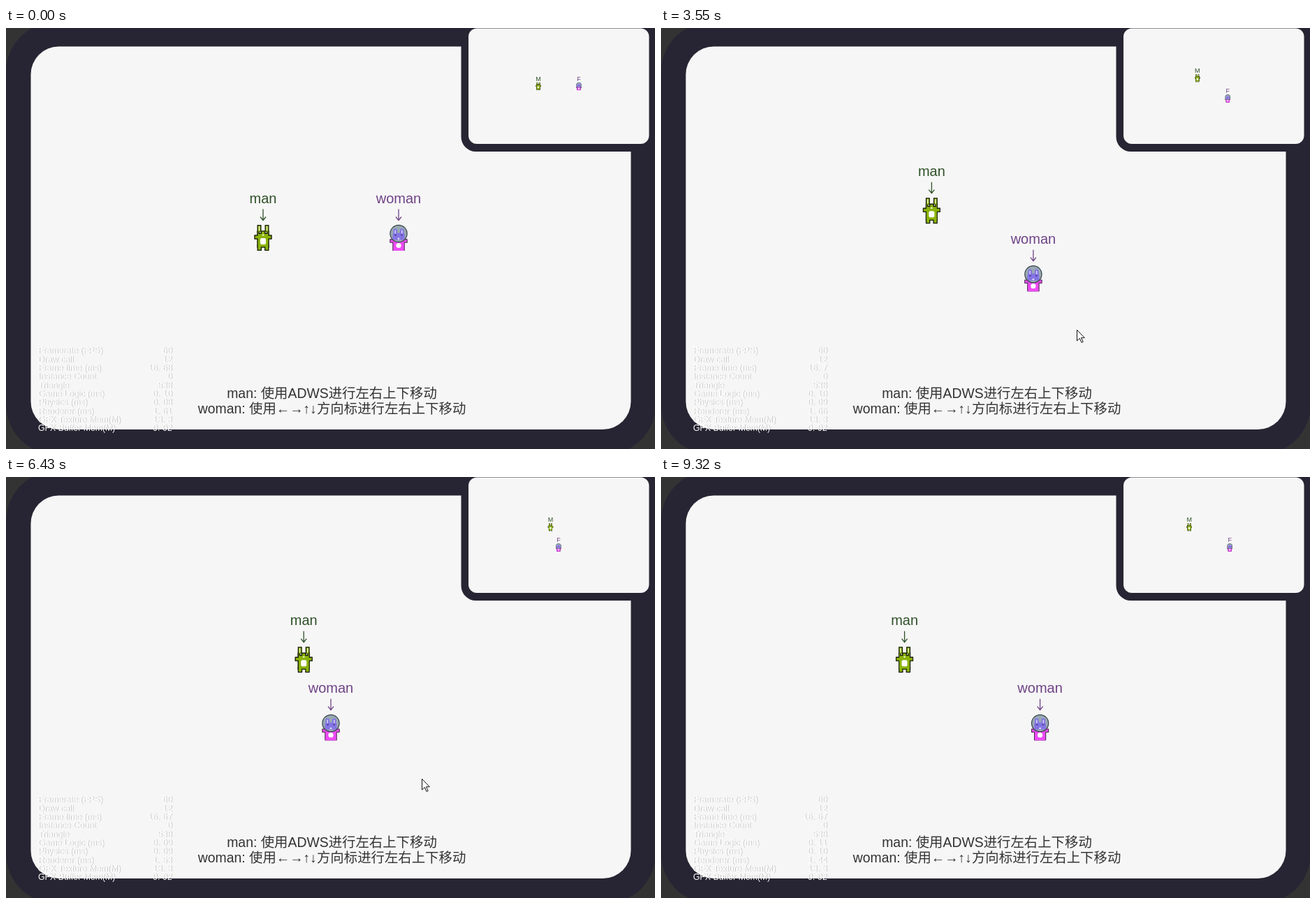
An HTML page with a canvas for the animation above (9.39 s loop, 929x603 px).

```html
<!DOCTYPE html>
<html lang="zh">
<head>
<meta charset="utf-8">
<title>Two players</title>
<style>
html, body { margin: 0; width: 100%; height: 100%; overflow: hidden; background: #333; }
canvas { display: block; width: 929px; height: 603px; }
</style>
</head>
<body>
<canvas id="stage" width="929" height="603"></canvas>
<script>
const ctx = document.getElementById('stage').getContext('2d');
const LOOP = 9390;
const CELL = 9.7;
const MINI = 0.3;
const FONT = '"Liberation Sans", Arial, "Noto Sans CJK SC", "Noto Sans CJK", sans-serif';
const DARK = '#272533';
const PAPER = '#f6f6f6';
const INK = '#333';

// Key poses: time, column, row. Steps between them are whole cells.
const MAN_PATH = [
  [2880, 0, 0], [3330, 0, -4], [3550, 2, -4], [3700, 2, -4], [5150, 6, -4],
  [6440, 6, -4], [6570, 7, -4], [7380, 1, -4], [7750, -2, -4]
];
const WOMAN_PATH = [
  [1900, 0, 0], [2230, -3, 0], [2860, -3, 6], [3750, -3, 6], [5000, -11, 6],
  [5340, -11, 6], [5660, -14, 6], [5880, -14, 6], [6430, -10, 6], [7380, -4, 6], [7550, -2, 6]
];

const LABELS = ['Framerate (FPS)', 'Draw call', 'Frame time (ms)', 'Instance Count', 'Triangle',
  'Game Logic (ms)', 'Physics (ms)', 'Renderer (ms)', 'GFX Texture Mem(M)', 'GFX Buffer Mem(M)'];

function noise(seed) {
  const v = Math.sin(seed * 12.9898 + 4.1) * 43758.5453;
  return v - Math.floor(v);
}

function position(path, t) {
  const next = path.findIndex(key => key[0] > t);
  if (next === 0) return { x: 0, y: 0 };
  const a = path.at(next < 0 ? -1 : next - 1);
  const b = path.at(next);
  const k = a === b ? 0 : (t - a[0]) / (b[0] - a[0]);
  const mix = i => Math.round(a[i] + (b[i] - a[i]) * k);
  return { x: mix(1), y: mix(2) };
}

function panel(x, y, w, h, r, color) {
  ctx.fillStyle = color;
  ctx.beginPath();
  ctx.roundRect(x, y, w, h, r);
  ctx.fill();
}

function text(str, x, y, size, color, align = 'center', weight = 400) {
  ctx.font = `${weight} ${size}px ${FONT}`;
  ctx.textAlign = align;
  ctx.fillStyle = color;
  ctx.fillText(str, x, y);
}

// Fills a rectangle and its mirror image across the middle line.
function pair(x, y, w, h, color) {
  ctx.fillStyle = color;
  ctx.fillRect(x, y, w, h);
  ctx.fillRect(-x - w, y, w, h);
}

function disc(x, y, r, color) {
  ctx.fillStyle = color;
  ctx.beginPath();
  ctx.arc(x, y, r, 0, Math.PI * 2);
  ctx.fill();
}

function manShape(inset, color) {
  const part = (x, y, w, h) => pair(x + inset, y + inset, w - 2 * inset, h - 2 * inset, color);
  part(2.5, -18.5, 6, 14);
  part(-8.5, -10, 17, 24);
  part(-12.5, -4, 25, 6);
  part(2, 10, 6.5, 8.5);
}

function drawMan() {
  manShape(0, '#1b200a');
  manShape(1.3, '#8ab30a');
  pair(4.8, -16.5, 1.6, 6, '#e4efb4');
  pair(2, -9, 4.5, 3.5, '#1b200a');
  pair(3.5, -8.5, 1.5, 1.5, '#fff');
  panel(-1.5, -5, 3, 2, 1, '#eef3d5');
  panel(-4, 0.5, 8, 9, 2, '#fff');
}

function drawWoman() {
  pair(-12.5, 2, 25, 5, '#4a2350');
  pair(-8.5, 3, 17, 15.5, '#4a2350');
  pair(-11.5, 3, 23, 3, '#ec4cf3');
  pair(-7.5, 3, 15, 15.5, '#ec4cf3');
  disc(0, -6, 12.7, '#38434a');
  disc(0, -6, 11.5, '#98a9b2');
  panel(-7.5, -13, 5.5, 12, 2, '#8474e4');
  panel(2, -13, 5.5, 12, 2, '#8474e4');
  panel(-8.5, -7, 17, 10, 3, '#8474e4');
  pair(4, -11, 1.6, 5, '#d5cff8');
  pair(3, -5, 3, 2, '#5547a6');
  panel(-1.5, 0, 3, 2.5, 1, '#d9d6ee');
  disc(0, 11, 3.6, '#fff');
}

function sprite(draw, x, y, scale) {
  ctx.save();
  ctx.translate(x, y);
  ctx.scale(scale, scale);
  draw();
  ctx.restore();
}

function downArrow(x, y, color) {
  ctx.strokeStyle = color;
  ctx.lineWidth = 1.3;
  ctx.beginPath();
  ctx.moveTo(x, y);
  ctx.lineTo(x, y + 16);
  ctx.moveTo(x - 4, y + 11);
  ctx.lineTo(x, y + 16);
  ctx.lineTo(x + 4, y + 11);
  ctx.stroke();
}

// Draws the large figure and returns a painter for its small copy.
function actor(draw, name, initial, home, miniHome, path, color, t) {
  const p = position(path, t);
  const x = home + p.x * CELL;
  const y = 300.5 + p.y * CELL;
  text(name, x, y - 49.5, 20, color);
  downArrow(x, y - 41, color);
  sprite(draw, x, y, 1);
  return () => {
    const mx = miniHome + p.x * CELL * MINI;
    const my = 83.5 + p.y * CELL * MINI;
    text(initial, mx, my - 7.5, 9, color);
    sprite(draw, mx, my, MINI);
  };
}

function statText(str, x, y) {
  text(str, x + 1, y, 12.3, 'rgba(0,0,0,0.2)', 'left');
  text(str, x, y, 12.3, '#fff', 'left');
}

function drawStats(t) {
  const n = Math.floor((t + 250) / 505);
  const reading = (low, spread, seed) => (low + spread * noise(n + seed)).toFixed(2);
  const values = ['60', '12', String(+reading(16.66, 0.04, 0)), '0', '538',
    reading(0.08, 0.04, 30), reading(0.08, 0.02, 60), reading(1.25, 0.5, 90), '13.3', '0.02'];
  LABELS.forEach((label, i) => {
    const y = Math.round(466.3 + i * 12.35);
    statText(label, 46, y);
    [...values[i]].forEach((c, k) => statText(c, 238 - (values[i].length - k) * 7, y));
  });
}

// The pointer swoops in along an arc, rests, then slips to the right and leaves.
function drawPointer(t) {
  if (t < 130 || t >= 8300) return;
  const p = Math.min(1, Math.floor((t - 130) / 80) / 4);
  const slip = t < 8160 ? 0 : Math.ceil((t - 8159) / 70) * 4;
  ctx.save();
  ctx.translate(722.5 - 127 * p + slip, 538.5 - 106 * p - 50 * Math.sin(Math.PI * p));
  ctx.fillStyle = '#fff';
  ctx.strokeStyle = '#111';
  ctx.lineWidth = 1;
  const shape = new Path2D('M0 0V15.5L3.8 12L6.5 18L8.7 17L6 11.2H10.8Z');
  ctx.fill(shape);
  ctx.stroke(shape);
  ctx.restore();
}

function render(t) {
  ctx.fillStyle = '#333';
  ctx.fillRect(0, 0, 929, 603);
  panel(0, -9, 930, 620, 72, DARK);
  panel(35.5, 26.5, 859, 548.5, 40, PAPER);

  const miniMan = actor(drawMan, 'man', 'M', 368, 762, MAN_PATH, '#2f5129', t);
  const miniWoman = actor(drawWoman, 'woman', 'F', 562, 820, WOMAN_PATH, '#6f4386', t);
  text('man: 使用ADWS进行左右上下移动', 466.5, 530, 19.4, INK, 'center', 300);
  text('woman: 使用←→↑↓方向标进行左右上下移动', 466.5, 552, 19.4, INK, 'center', 300);

  panel(651.5, -9, 280, 186, [0, 0, 0, 21], DARK);
  panel(662, 0.5, 258.5, 165.5, 12, PAPER);
  miniMan();
  miniWoman();

  drawStats(t);
  drawPointer(t);
}

const began = performance.now();
function tick() {
  render((performance.now() - began) % LOOP);
  requestAnimationFrame(tick);
}
tick();
</script>
</body>
</html>
```
